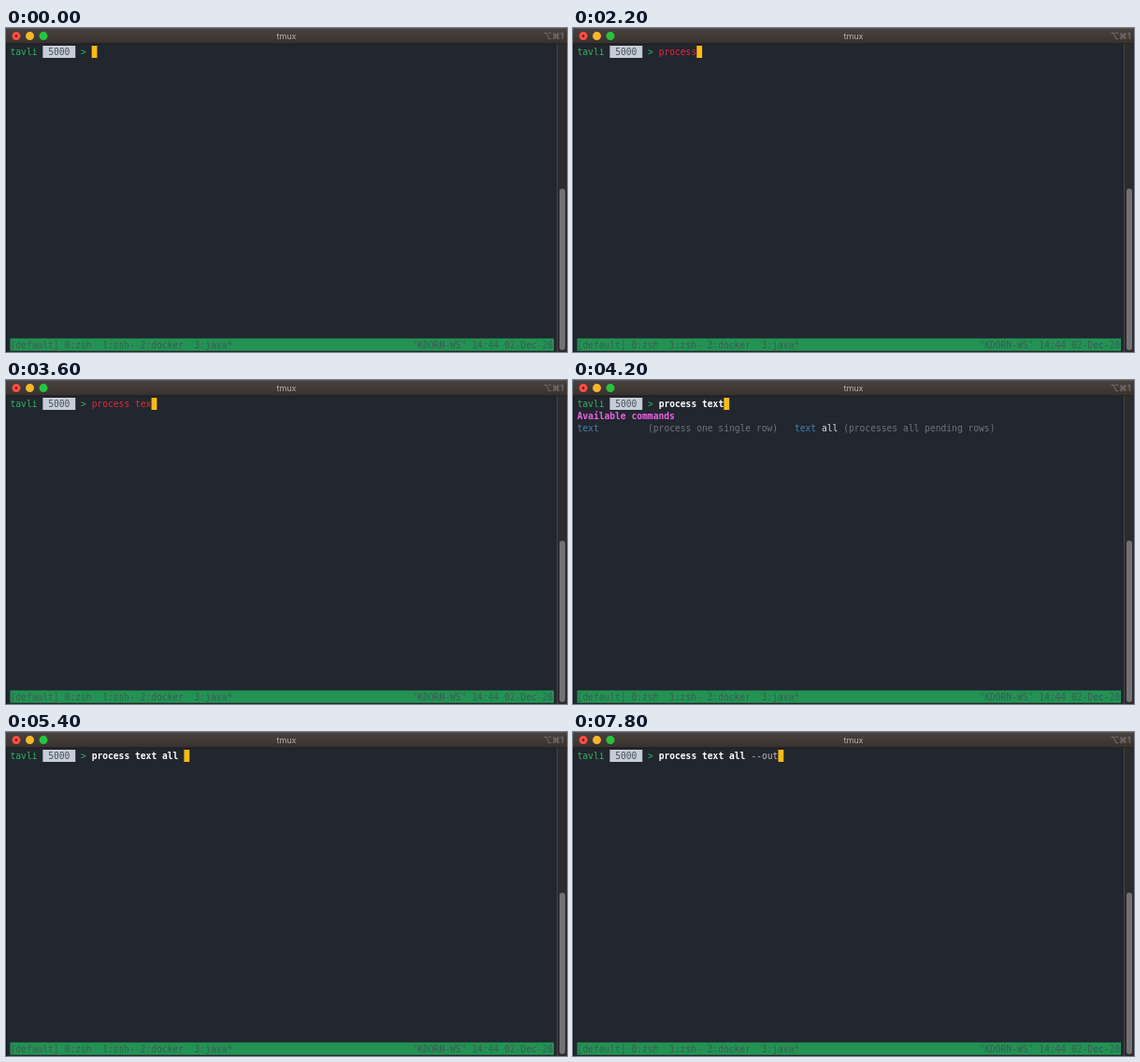
An HTML page with a canvas that plays this animation: 600x347 px, repeating every 8 s.

```html
<!DOCTYPE html>
<html lang="en">
<head>
<meta charset="utf-8">
<title>Terminal</title>
<style>
html, body { margin: 0; width: 100%; height: 100%; overflow: hidden; background: #22262e; }
canvas { display: block; width: 600px; height: 347px; }
</style>
</head>
<body>
<canvas id="stage" width="600" height="347"></canvas>
<script>
const ctx = document.getElementById('stage').getContext('2d');
const LOOP = 8000, CELL = 5.81, LEFT = 4.5, TOP = 19, ROW = 13;
const MONO = '9.65px "DejaVu Sans Mono", monospace';
const PROMPT_END = 15;
const RED = '#e6283f', WHITE = '#ffffff', BLUE = '#3f83ad', GREY = '#6f757e', GREEN = '#2bb561';

// [start in ms, typed line]
const typing = [
  [0, ''],
  [1600, 'p'], [1800, 'pro'], [2000, 'proce'], [2200, 'process'],
  [2600, 'process a'], [2800, 'process '], [3000, 'process t'],
  [3400, 'process te'], [3600, 'process tex'], [3800, 'process text'],
  [4600, 'process text '], [4800, 'process text a'], [5000, 'process text al'],
  [5200, 'process text all'], [5400, 'process text all '],
  [6000, 'process text all -'], [6200, 'process text all --'],
  [7200, 'process text all --o'], [7400, 'process text all --ou'], [7600, 'process text all --out']
];
const commands = ['process text all', 'process text'];

function rect(x, y, w, h, color) {
  ctx.fillStyle = color;
  ctx.fillRect(x, y, w, h);
}

function dot(x, y, r, color) {
  ctx.fillStyle = color;
  ctx.beginPath();
  ctx.arc(x, y, r, 0, 7);
  ctx.fill();
}

function label(str, x, y, font, color, align = 'left') {
  ctx.font = font;
  ctx.fillStyle = color;
  ctx.textAlign = align;
  ctx.fillText(str, x, y);
}

const colX = col => LEFT + col * CELL;

function print(str, col, row, color, bold) {
  label(str, colX(col), TOP + row * ROW + 10, (bold ? 'bold ' : '') + MONO, color);
}

function drawWindow() {
  rect(0, 0, 600, 347, '#22262e');
  const bar = ctx.createLinearGradient(0, 0, 0, 17);
  bar.addColorStop(0, '#4a423f');
  bar.addColorStop(1, '#39312e');
  rect(0, 0, 600, 17, bar);
  rect(0, 0, 600, 1, '#5c5451');
  rect(0, 16.5, 600, 0.8, '#1a1718');
  dot(11, 8.6, 4.5, '#fc4d46');
  dot(11, 8.6, 1.3, '#7c100c');
  dot(25.5, 8.6, 4.5, '#fdb726');
  dot(40, 8.6, 4.5, '#28c440');
  label('tmux', 300, 12, '9px Inter, sans-serif', '#b9b3b1', 'center');
  label('⌥⌘1', 596.5, 11.5, '9px Inter, "DejaVu Sans", sans-serif', '#88807d', 'right');

  rect(589, 17, 11, 330, '#2c2b2e');
  rect(589, 17, 1, 330, '#454447');
  ctx.fillStyle = '#757074';
  ctx.beginPath();
  ctx.roundRect(592, 172, 6, 173, 3);
  ctx.fill();
  rect(0, 17, 1, 330, '#15171b');

  rect(LEFT, 332.5, 581.5, 13.3, '#239354');
  const status = '#3c5a55';
  label('[default] 0:zsh  1:zsh- 2:docker  3:java*', LEFT, 342.5, MONO, status);
  label('"KDORN-WS" 14:44 02-Dec-20', colX(74), 342.5, MONO, status);
}

function drawPrompt(line) {
  print('tavli', 0, 0, GREEN);
  rect(colX(6), TOP, CELL * 6, ROW, '#c5cdd9');
  print('5000', 7, 0, '#4b5159');
  print('>', 13, 0, GREEN);

  const known = commands.find(c => line.startsWith(c)) || '';
  print(known, PROMPT_END, 0, WHITE, true);
  print(line.slice(known.length), PROMPT_END + known.length, 0, known ? '#b5babf' : RED);
  rect(colX(PROMPT_END + line.length), TOP, CELL, ROW, '#fdbc12');
}

function drawCompletions() {
  print('Available commands', 0, 1, '#ee62e6', true);
  print('text', 0, 2, BLUE);
  print('(process one single row)', 13, 2, GREY);
  print('text', 40, 2, BLUE);
  print('all', 45, 2, '#d9dee3');
  print('(processes all pending rows)', 49, 2, GREY);
}

const start = performance.now();
function frame(now) {
  const t = Math.max(0, now - start) % LOOP;
  drawWindow();
  drawPrompt(typing.findLast(step => step[0] <= t)[1]);
  if (t >= 4000 && t < 4600) drawCompletions();
  requestAnimationFrame(frame);
}
frame(start);
</script>
</body>
</html>
```
